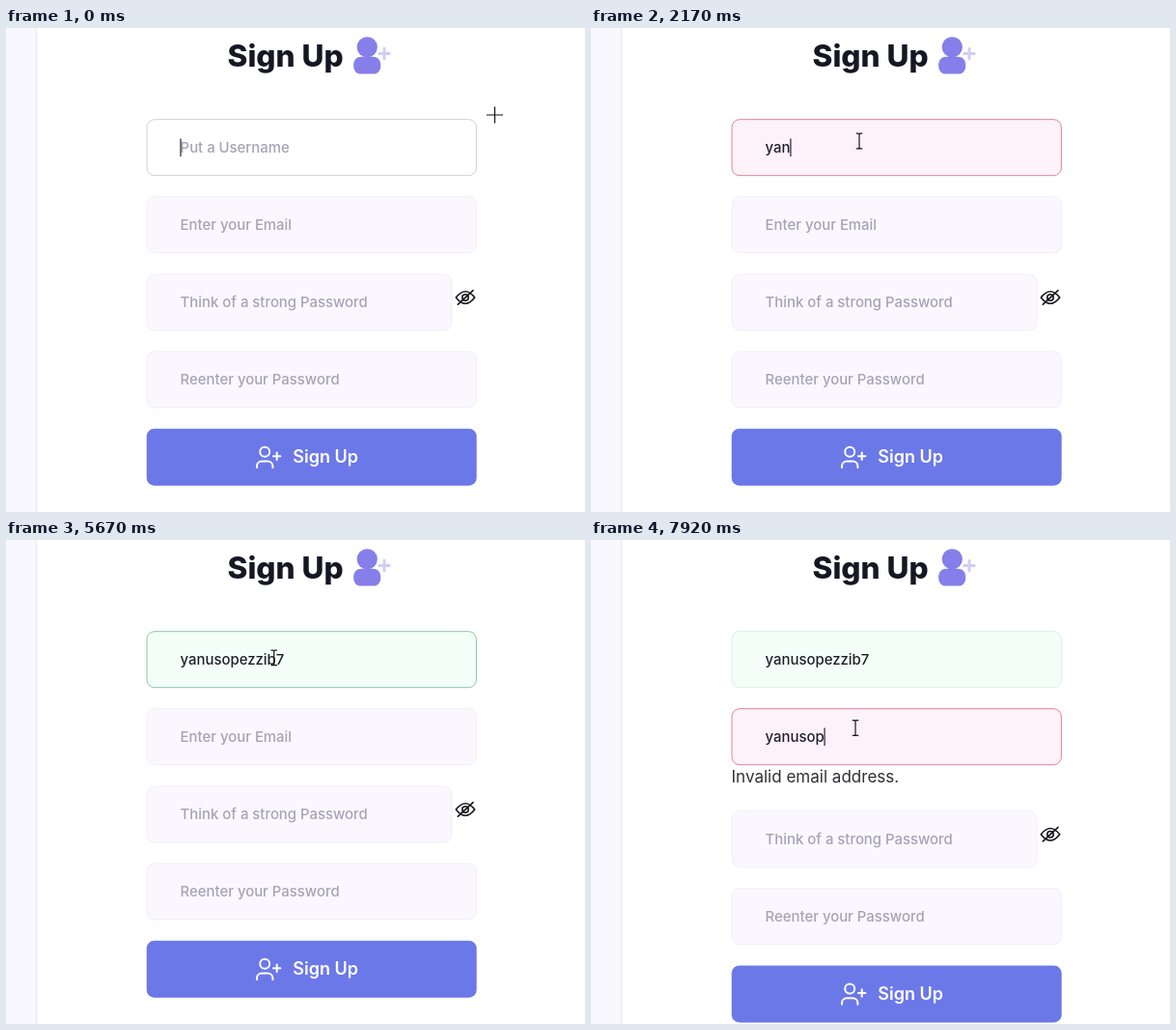
Recreate the animation shown at these times as an HTML page. Size 600x501 px, loop 8000 ms.

```html
<!DOCTYPE html>
<html lang="en">
<head>
<meta charset="utf-8">
<title>Sign up form</title>
<style>
  html, body { margin: 0; width: 100%; height: 100%; overflow: hidden; background: #fff; }
  svg { display: block; width: 600px; height: 501px; }
  text { font-family: Inter, sans-serif; font-optical-sizing: none; white-space: pre; }
  .title { font-size: 31.6px; font-weight: 800; fill: #171724; text-anchor: middle; }
  .value { font-size: 14.9px; font-weight: 500; fill: #20202a; }
  .hint { font-size: 14.9px; font-weight: 500; fill: #a5a3b6; }
  .error { font-size: 17.05px; fill: #303038; }
  .action { font-size: 18px; font-weight: 600; fill: #fff; }
  .line { fill: none; stroke-linecap: round; stroke-linejoin: round; }
</style>
</head>
<body>
<svg viewBox="0 0 600 501">
  <rect width="600" height="501" fill="#fff"/>
  <rect width="31" height="501" fill="#faf8ff"/>
  <rect x="31" width="1" height="501" fill="#eae7f1"/>

  <text class="title" x="289.6" y="40">Sign Up</text>
  <g fill="#867fe9">
    <circle cx="374.3" cy="19.8" r="10.6"/>
    <rect x="360.2" y="29.8" width="28" height="17.8" rx="7.5"/>
  </g>
  <path class="line" d="M386.8 26.5h10.4M392 21.3v10.4" stroke="#d1cdf5" stroke-width="3"/>

  <g id="fields"></g>

  <g id="eye" class="line" stroke="#15151c" stroke-width="1.6">
    <path d="M466.3 279Q476 266.5 485.7 279Q476 291.5 466.3 279Z"/>
    <circle cx="476" cy="279" r="3.2"/>
    <path d="M468.3 286.2L484 271.6"/>
  </g>

  <g id="button">
    <rect x="145.7" y="414.7" width="342" height="59" rx="8" fill="#6b78e8"/>
    <g class="line" stroke="#fff" stroke-width="2">
      <circle cx="268.2" cy="438.7" r="5"/>
      <path d="M260 455v-1.6a5 5 0 0 1 5-5h6.4a5 5 0 0 1 5 5v1.6M277 443.2h7.4M280.7 439.5v7.4"/>
    </g>
    <text class="action" x="297.3" y="449.8">Sign Up</text>
  </g>

  <text class="error" id="nameError" x="145.5" y="171">Username needs to be between 3 to 25<tspan x="145.5" dy="25.8">characters.</tspan></text>
  <text class="error" id="mailError" x="145.5" y="251.3">Invalid email address.</text>

  <rect id="caret" width="1.2" height="18.5" fill="#25252d"/>
  <path id="cross" d="M-8.5 0h17M0-8.5v17" fill="none" stroke="#111" stroke-width="1.2"/>
  <path id="beam" d="M-3.2-7.8h2.2q1 0 1 1v13.6q0 1-1 1h-2.2M3.2-7.8H1q-1 0-1 1v13.6q0 1 1 1h2.2"
        fill="none" stroke="#16161c" stroke-width="1.2"/>
</svg>

<script>
const LOOP = 8000, TEXT_X = 180.6, LINE = 25.75, FADE = 150, BLINK = 500;
const $ = id => document.getElementById(id);

const LOOKS = {
  idle:  [[250, 248, 254], [241, 238, 247]],
  focus: [[255, 255, 255], [214, 206, 211]],
  bad:   [[254, 242, 250], [220, 132, 151]],
  good:  [[244, 254, 248], [139, 198, 167]],
  done:  [[244, 254, 248], [216, 239, 227]]
};

const USER = 'yanusopezzib7';
const CLICK = 6170;
const nameKeys = [1750, 2000, 2170, 2920, 3080, 3250, 3500, 3750, 4000, 4170, 4250, 4420, 5170];
const mailKeys = [6580, 6830, 7000, 7170, 7330, 7500, 7750];
const nameLooks = [[-LOOP, 'focus'], [1750, 'bad'], [2170, 'good'], [CLICK, 'done']];
const mailLooks = [[-LOOP, 'idle'], [CLICK, 'focus'], [6580, 'bad']];
const idle = [[-LOOP, 'idle']];

function add(parent, tag, attrs, text = '') {
  const el = document.createElementNS('http://www.w3.org/2000/svg', tag);
  for (const key in attrs) el.setAttribute(key, attrs[key]);
  el.textContent = text;
  return parent.appendChild(el);
}

function makeField(hint, y, width, keys, looks) {
  const g = add($('fields'), 'g', {});
  return {
    g, y, keys, looks,
    box: add(g, 'rect', { x: 146, y: y + .5, width, height: 58, rx: 8 }),
    hint: add(g, 'text', { class: 'hint', x: TEXT_X, y: y + 35 }, hint),
    value: add(g, 'text', { class: 'value', x: TEXT_X, y: y + 35 })
  };
}

const name = makeField('Put a Username', 94.2, 341.4, nameKeys, nameLooks);
const mail = makeField('Enter your Email', 174.2, 341.4, mailKeys, mailLooks);
const pass = makeField('Think of a strong Password', 254.4, 316, [], idle);
const again = makeField('Reenter your Password', 334.4, 341.4, [], idle);
const fields = [name, mail, pass, again];

const clamp = v => Math.max(0, Math.min(1, v));
const ease = v => v * v * (3 - 2 * v);
const mix = (a, b, k) => a + (b - a) * k;
const show = (el, on) => el.setAttribute('visibility', on ? 'visible' : 'hidden');
const shift = (el, x, y) => el.setAttribute('transform', `translate(${x} ${y})`);

function paintField(f, t) {
  const i = f.looks.filter(([at]) => at <= t).length - 1;
  const [at, look] = f.looks[i];
  const from = LOOKS[f.looks[Math.max(0, i - 1)][1]], to = LOOKS[look];
  const k = clamp((t - at) / FADE);
  const [fill, stroke] = to.map((c, j) => `rgb(${c.map((v, n) => mix(from[j][n], v, k))})`);
  f.box.setAttribute('fill', fill);
  f.box.setAttribute('stroke', stroke);

  const typed = USER.slice(0, f.keys.filter(key => key <= t).length);
  if (f.value.textContent !== typed) f.value.textContent = typed;
  show(f.hint, !typed);
}

function paintCaret(t) {
  const f = t < CLICK ? name : mail;
  const start = f === name ? -330 : CLICK;
  const last = Math.max(start, ...f.keys.filter(key => key <= t));
  const width = f.value.textContent ? f.value.getComputedTextLength() : 0;
  shift($('caret'), TEXT_X + width - .2, f.y + 20.3);
  show($('caret'), Math.floor((t - last) / BLINK) % 2 === 0);
}

function paintPointer(t) {
  const a = ease(clamp((t - 60) / 360)), b = ease(clamp((t - 5590) / 530));
  const x = mix(mix(506.5, 278, a), 274, b);
  const y = mix(mix(90, 117, a), 194.5, b);
  const overField = x < 487 && fields.some(f => y > f.y && y < f.y + 59);
  for (const id of ['cross', 'beam']) {
    shift($(id), x, y);
    show($(id), (id === 'beam') === overField);
  }
}

function paint(t) {
  const nameBad = t >= 1750 && t < 2170, mailBad = t >= 6580;
  const drop = nameBad ? 2 * LINE : 0;
  const lower = drop + (mailBad ? LINE : 0);
  show($('nameError'), nameBad);
  show($('mailError'), mailBad);
  shift(mail.g, 0, drop);
  for (const el of [pass.g, again.g, $('eye'), $('button')]) shift(el, 0, lower);
  fields.forEach(f => paintField(f, t));
  paintCaret(t);
  paintPointer(t);
}

function tick() {
  paint(performance.now() % LOOP);
  requestAnimationFrame(tick);
}
tick();
</script>
</body>
</html>
```
